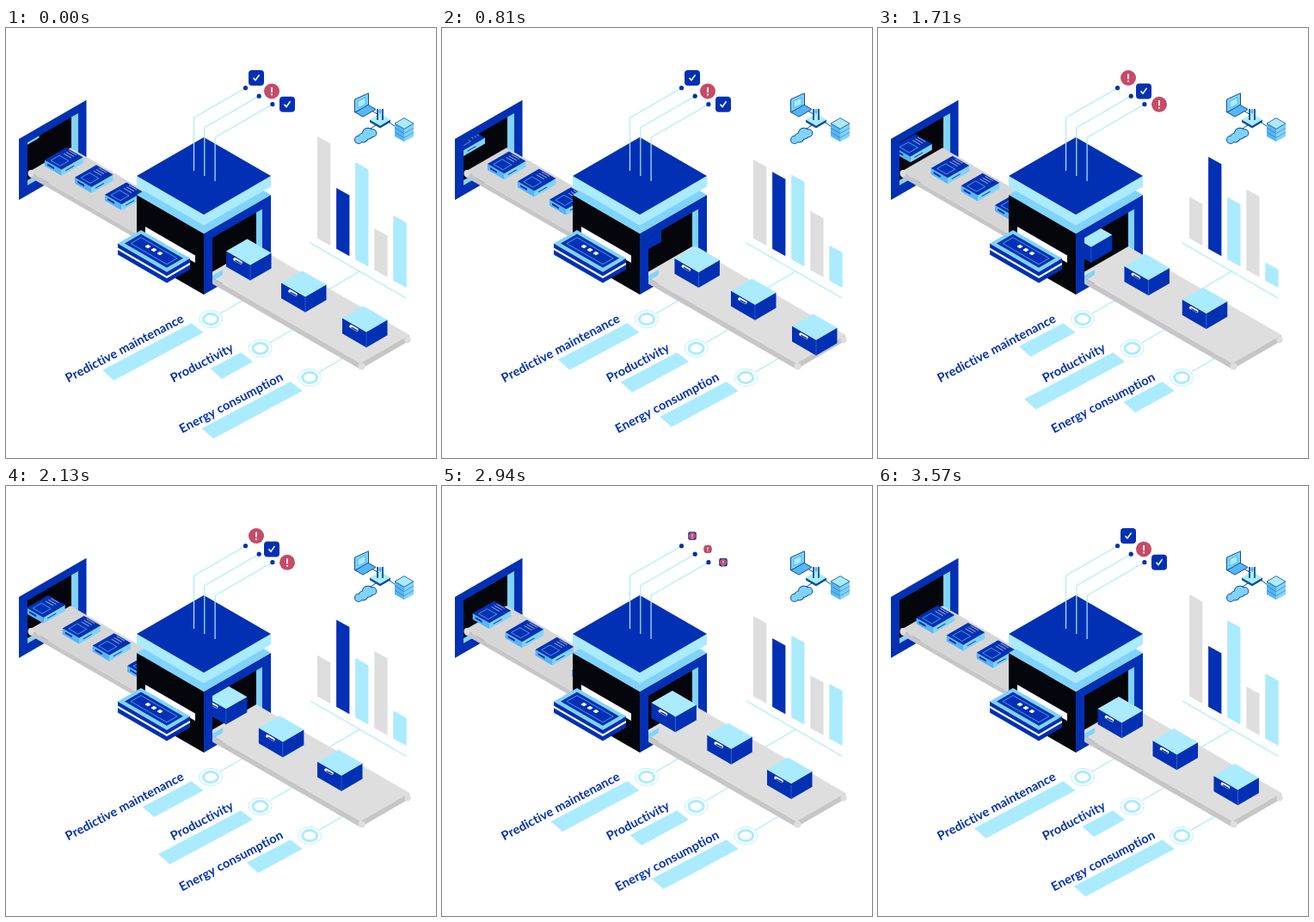
Animation, 500 px wide and 500 px high, one loop 3.6 s. Source, as an HTML page with a canvas:

```html
<!DOCTYPE html>
<html lang="en">
<head>
<meta charset="utf-8">
<title>Smart production line</title>
<style>
html, body { margin: 0; width: 100%; height: 100%; overflow: hidden; background: #fff; }
canvas { display: block; }
</style>
</head>
<body>
<canvas id="stage" width="500" height="500"></canvas>
<script>
const ctx = document.getElementById('stage').getContext('2d');
const LOOP = 3600;
const K = 0.577; // slope of both isometric axes
const BLUE = '#0230b4', LIGHT = '#abebff', SKY = '#7fd3fc', MID = '#55b5f5', INK = '#0b4f9c',
      GREY = '#dedede', SHADE = '#c6c6c6', BLACK = '#04060c', RED = '#c54b68';

const ease = p => (1 - Math.cos(Math.PI * Math.min(1, Math.max(0, p)))) / 2;
// Rises from 0 to 1 at the peak time, then falls back by the end of the loop.
const swing = (t, peak) => ease(t < peak ? t / peak : (LOOP - t) / (LOOP - peak));

function trace(points, closed) {
  ctx.beginPath();
  for (let i = 0; i < points.length; i += 2) ctx.lineTo(points[i], points[i + 1]);
  if (closed) ctx.closePath();
}
function paint(fill, stroke, width = 1) {
  if (fill) { ctx.fillStyle = fill; ctx.fill(); }
  if (stroke) { ctx.strokeStyle = stroke; ctx.lineWidth = width; ctx.stroke(); }
}
function line(color, width, ...points) {
  trace(points);
  paint(null, color, width);
}
function oval(x, y, rx, ry, fill, stroke, width) {
  ctx.beginPath();
  ctx.ellipse(x, y, rx, ry, 0, 0, 7);
  paint(fill, stroke, width);
}
// Upright panel: w across along the slope, h down.
function wall(x, y, w, h, slope, fill, stroke) {
  trace([x, y, x + w, y + w * slope, x + w, y + w * slope + h, x, y + h], true);
  paint(fill, stroke);
}
// Flat panel from its left corner: a towards upper right, b towards lower right.
function tile(x, y, a, b, fill, stroke, width) {
  trace([x, y, x + a, y - a * K, x + a + b, y + (b - a) * K, x + b, y + b * K], true);
  paint(fill, stroke, width);
}
function cuboid(x, y, a, b, h, top, left, right = left) {
  wall(x, y, b, h, K, left);
  wall(x + b, y + b * K, a, h, -K, right);
  tile(x, y, a, b, top);
}
function at(x, y, draw, scale = 1) {
  ctx.save();
  ctx.translate(x, y);
  ctx.scale(scale, scale);
  draw();
  ctx.restore();
}
// Hides everything left of and above a doorway.
function through(x, y, w, draw) {
  ctx.save();
  trace([x, y, x + w, y - w * K, 500, y - w * K, 500, 500, x, 500], true);
  ctx.clip();
  draw();
  ctx.restore();
}
// Every item travels from its stop to the next one during a loop.
function convey(t, stops, offset, draw) {
  for (let i = 0; i < stops.length - 1; i++) {
    const x = stops[i] + (stops[i + 1] - stops[i]) * t / LOOP;
    at(x, offset + x * K, draw);
  }
}

function device() {
  cuboid(0, -3, 25, 19.5, 7, BLUE, MID, SKY);
  tile(7, -2.5, 10, 11, null, MID, 0.8);
  for (let i = 0; i < 3; i++) tile(22 + i * 3, -10.5 - i * 1.7, 0, 9, null, '#8fa0c8', 0.8);
  wall(3, 1, 8, 2.2, K, BLUE);
  wall(24, 9, 10, 1, -K, BLUE);
}

function entry(t) {
  wall(15, 129, 78.5, 71, -K, BLUE);
  wall(25, 133, 59, 50, -K, BLACK);
  wall(76, 103.5, 8, 45, -K, SKY);
  wall(25, 177, 24, 6, -K, SKY);
  cuboid(27, 167, 48, 133, 6, '#d6d6d6', SHADE);
  oval(29, 169, 3.5, 4, GREY);
  through(25, 133, 59, () => convey(t, [-6, 45, 80, 115, 159], 130.5, device));
}

function machine() {
  cuboid(152, 194, 78, 78, 71, SKY, BLACK, BLUE);
  wall(162, 231, 58, 8.5, K, '#fff');
  wall(240, 244, 58, 50, -K, BLACK);
  wall(291, 214.6, 7, 49, -K, SKY);
  cuboid(152, 172, 78, 78, 12.5, BLUE, LIGHT);
}

function tray() {
  cuboid(130, 257.5, 27, 57, 6, '#fff', BLUE);
  cuboid(130, 255, 27, 57, 3, '#fff', '#fff');
  cuboid(130, 250.5, 27, 57, 5, SKY, BLUE);
  tile(138, 250.5, 19, 49, BLUE);
  tile(145, 250.5, 12, 42, null, MID, 0.8);
  for (let i = 0; i < 3; i++) tile(162 + i * 7, 254 + i * 4, 3, 3, '#fff', '#fff');
}

function carton() {
  cuboid(0, 0, 24.5, 28, 18, LIGHT, BLUE);
  line('#2f62d0', 0.8, 28, 17, 28, 34);
  ctx.lineCap = 'round';
  line('#fff', 3.6, 10, 9.5, 17, 13.5);
  line(BLUE, 1.4, 11, 11, 17, 14.3);
  ctx.lineCap = 'butt';
}

function exit(t) {
  const stops = [187, 256, 320, 391];
  if (t < 1665) stops.push(462);
  through(240, 244, 58, () => {
    cuboid(234, 287, 57, 178, 7, GREY, SHADE);
    wall(240, 288, 12, 6, -K, SKY);
    oval(413.5, 393.5, 4, 4, GREY);
    oval(467, 362.5, 3.5, 4, GREY);
    convey(t, stops, 111.7, carton);
  });
}

function alertIcon() {
  oval(0, 0, 9, 9, RED);
  line('#fff', 1.8, 0, -4.5, 0, 1.5);
  oval(0, 4, 1.1, 1.1, '#fff');
}
function checkIcon() {
  ctx.beginPath();
  ctx.roundRect(-9, -9, 18, 18, 4);
  paint(BLUE);
  line('#fff', 1.6, -3.5, 0, -1, 2.8, 3.5, -3.5);
}

function sensors(t) {
  const swapped = ease((t - 820) / 580) - ease((t - 2650) / 560);
  for (let i = 0; i < 3; i++) {
    const x = 218.5 + i * 12.3, dotX = 278.5 + i * 15.7, dotY = 69.7 + i * 9.5;
    const alert = i === 1 ? 1 - swapped : swapped;
    line(LIGHT, 1.2, x, 166 + i * 6, x, dotY + (dotX - x) * K, dotX, dotY);
    oval(dotX, dotY, 2.6, 2.6, BLUE);
    at(291 + i * 18, 58 + i * 15.4, checkIcon, 1 - alert);
    at(291 + i * 18, 58 + i * 15.4, alertIcon, alert);
  }
}

function chart(t) {
  line(LIGHT, 1.2, 354, 250, 465, 314);
  line(LIGHT, 1.2, 411, 283, 360, 313);
  const colors = [GREY, BLUE, LIGHT, GREY, LIGHT];
  // height at rest, growth, peak time
  [[118.5, -73, 1950], [70.8, 36.5, 1600], [113, -44, 2100], [48.4, 45.5, 1750], [75.7, -57, 1420]]
    .forEach(([rest, growth, peak], i) => {
      const height = rest + growth * swing(t, peak);
      wall(362 + i * 22.1, 244.5 + i * 12.3 - height, 15.3, height, 0.55, colors[i]);
    });
}

function metrics(t) {
  ctx.font = '700 14.5px Lato, sans-serif';
  ctx.letterSpacing = '0.1px';
  ctx.textAlign = 'right';
  // label, bar length at rest, growth
  [['Predictive maintenance', 103.5, -52], ['Productivity', 35.5, 67.5], ['Energy consumption', 103, -58]]
    .forEach(([label, rest, growth], i) => {
      const length = rest + growth * swing(t, 1750);
      at(238 + i * 57.6, 338.5 + i * 34, () => {
        line(LIGHT, 1.2, 11, -6.5, 42, -24.5);
        oval(0, 0, 13.5, 10, '#fff', LIGHT, 0.8);
        oval(0, 0, 8.5, 6.2, '#fff', LIGHT, 3);
        const x = -22.5 - length, y = 4.7 + length * 0.527;
        trace([-22.5, 4.7, -8.5, 15.5, x + 13.5, y + 12, x, y], true);
        paint(LIGHT);
        ctx.translate(-30, 2.5);
        ctx.rotate(-0.485);
        ctx.fillStyle = BLUE;
        ctx.fillText(label, 0, 0);
      });
    });
}

function network() {
  line(INK, 1, 425, 96, 435, 102, 453, 115);
  line(INK, 1, 424, 117, 436, 109);
  // laptop
  wall(405.5, 83, 16, 15, -0.45, SKY, INK);
  wall(409, 85, 9, 8, -0.45, LIGHT, MID);
  tile(406, 98, 15, 9, MID, INK);
  // router
  cuboid(423, 106.5, 12, 12, 3, LIGHT, INK);
  for (const x of [432, 438]) line(INK, 1.8, x, 107, x, 94);
  oval(435, 97, 1.7, 3, MID);
  // cloud: outline first, then the fill on top
  for (const [grow, color] of [[1, INK], [0, SKY]])
    for (let i = 0; i < 4; i++)
      oval(410 + i * 5.4, 130 - i * 2.6 - (i === 2 ? 2 : 0), 4 + grow + i % 3, 4 + grow + i % 3, color);
  // server
  for (let y = 121; y >= 111; y -= 5) {
    cuboid(452, y, 11, 11, 5, LIGHT, MID, SKY);
    tile(452, y, 11, 11, null, INK, 0.8);
  }
}

function render(t) {
  ctx.fillStyle = '#fff';
  ctx.fillRect(0, 0, 500, 500);
  entry(t);
  machine();
  tray();
  sensors(t);
  network();
  chart(t);
  metrics(t);
  exit(t);
}

function tick() {
  render(performance.now() % LOOP);
  requestAnimationFrame(tick);
}
tick();
</script>
</body>
</html>
```
